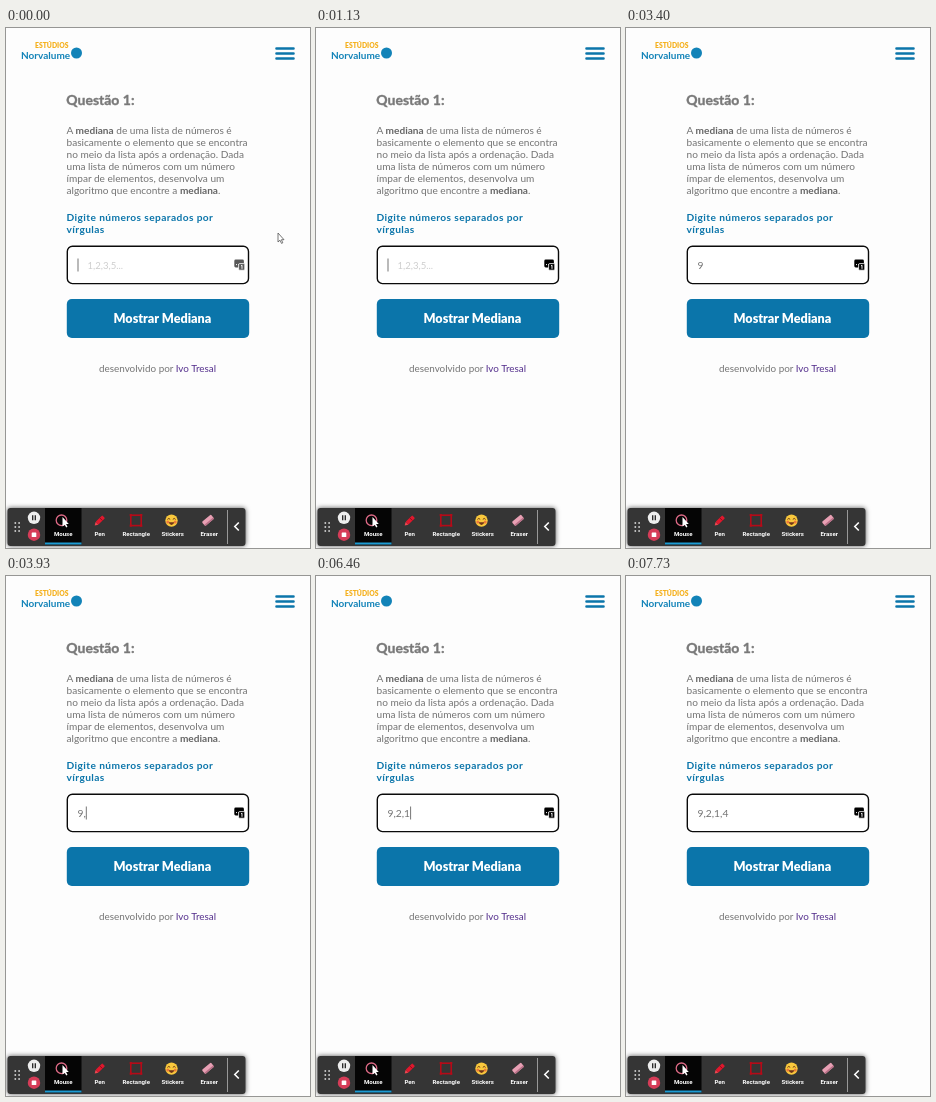
An HTML page that plays this animation: 304 px wide and 520 px high, repeating every 8 s.

```html
<!DOCTYPE html>
<html lang="pt-BR">
<head>
<meta charset="utf-8">
<title>Mediana</title>
<style>
  html, body { margin: 0; width: 100%; height: 100%; overflow: hidden; background: #fdfdfd; }
  svg { display: block; width: 304px; height: 520px; }
  text { font-family: Lato, sans-serif; white-space: pre; }
  .body { font-size: 10.1px; fill: #727272; }
  .body tspan { font-weight: 700; fill: #666; }
  .title { font-size: 14px; font-weight: 700; fill: #797979; stroke: #797979; stroke-width: .4px; }
  .label { font-size: 10.2px; font-weight: 700; letter-spacing: .4px; fill: #0b75aa; }
  .button { font-size: 12.6px; font-weight: 900; fill: #fff; text-anchor: middle; }
  .tool { font: 700 6.1px Roboto, sans-serif; fill: #fff; text-anchor: middle; }
  .bar { filter: drop-shadow(0 0 2.5px #000a); }
</style>
</head>
<body>
<svg viewBox="0 0 304 520">
  <rect width="304" height="520" fill="#fdfdfd"/>

  <g id="header">
    <text x="29" y="20" font-size="6.8" font-weight="900" fill="#f5b01c">ESTÚDIOS</text>
    <text x="15" y="31" font-size="10" font-weight="700" fill="#1283b8">Norvalume</text>
    <circle cx="70.5" cy="25" r="5.5" fill="#1283b8"/>
    <path d="M270.5 20.5h17M270.5 25.5h17M270.5 30.5h17" stroke="#0b75aa" stroke-width="2.6" stroke-linecap="round"/>
  </g>

  <text class="title" x="60.3" y="77">Questão 1:</text>
  <g id="paragraph"></g>
  <text class="label" x="60.5" y="193.2">Digite números separados por</text>
  <text class="label" x="60.5" y="205.4">vírgulas</text>

  <rect x="61.3" y="218.2" width="181.2" height="37.4" rx="5.2" fill="#fff" stroke="#0a0a0a" stroke-width="1.4"/>
  <text id="placeholder" x="81.5" y="241.4" font-size="9.6" fill="#cecece">1,2,3,5...</text>
  <text id="value" x="71.5" y="241.2" font-size="10.3" fill="#747474"></text>
  <rect id="caret" y="230.5" width="1" height="13" fill="#777"/>
  <g id="keypad">
    <rect x="228.3" y="231.5" width="9.6" height="8" rx="1.4"/>
    <path d="M230 236.6h1m1 0h1" stroke="#fff" stroke-width="1"/>
    <rect x="232.6" y="235.6" width="6.2" height="6.6" rx="1" stroke="#fff" stroke-width=".8"/>
    <path d="M235 238l1-.8v3.6" fill="none" stroke="#fff" stroke-width=".9"/>
  </g>

  <rect x="60.8" y="271" width="182.4" height="39" rx="5" fill="#0b75aa"/>
  <text class="button" x="156.4" y="295.2">Mostrar Mediana</text>
  <text x="93" y="344.3" font-size="9.9" fill="#747474">desenvolvido por <tspan fill="#55308d">Ivo Tresal</tspan></text>

  <path id="pointer" d="M272 205v9l2-1.8 1.5 3.2 1.3-.6-1.4-3.1h2.6z" fill="#fff" stroke="#555" stroke-width=".8"/>

  <g class="bar">
    <rect x="1.5" y="480" width="238" height="38" rx="3" fill="#353535"/>
    <rect x="39" y="480" width="36.5" height="36.5" fill="#050505"/>
    <rect x="39" y="514.5" width="36.5" height="2" fill="#1c9bd3"/>
  </g>
  <path d="M9.3 495v9M13.1 495v9" stroke="#ccc" stroke-width="1.9" stroke-linecap="round" stroke-dasharray="0 4"/>
  <circle cx="28" cy="489.8" r="6.2" fill="#eee"/>
  <path d="M26.7 487.3v5M29.3 487.3v5" stroke="#222" stroke-width="1.3"/>
  <circle cx="28" cy="506.7" r="6.2" fill="#d63c58"/>
  <rect x="25.7" y="504.4" width="4.6" height="4.6" rx=".6" fill="#fff"/>
  <path d="M221.5 482v34" stroke="#999"/>
  <path d="M232.8 494.5l-4 4 4 4" fill="none" stroke="#fff" stroke-width="1.6"/>

  <circle cx="55.5" cy="492.3" r="5.3" fill="none" stroke="#dd6a86" stroke-width="1.3"/>
  <path d="M56.5 489v9.5l2.2-1.8 1.5 2.8 1.3-.7-1.4-2.7h2.7z" fill="#fff"/>
  <g transform="translate(93.5 492.8) rotate(-45) scale(.9)">
    <rect x="-4" y="-2.2" width="10.5" height="4.4" rx="1" fill="#e0182d"/>
    <path d="M-4-2.2L-7.5 0-4 2.2z" fill="#f0454f"/>
    <path d="M2.5-2.2v4.4" stroke="#8d0c1b"/>
  </g>
  <rect x="124.8" y="487.2" width="10.4" height="10.4" fill="none" stroke="#b50a18" stroke-width="1.6"/>
  <path d="M123.7 487.2h2.2m8.2 0h2.2m-12.6 10.4h2.2m8.2 0h2.2" stroke="#b50a18" stroke-width="2.2"/>
  <circle cx="165.5" cy="492.6" r="6.2" fill="#f9c83c"/>
  <path d="M161.4 491.4q1.4-2 2.8 0M166.8 491.4q1.4-2 2.8 0" fill="none" stroke="#6b3a17"/>
  <circle cx="161.8" cy="494" r="1.5" fill="#ee7a3c"/>
  <circle cx="169.2" cy="494" r="1.5" fill="#ee7a3c"/>
  <path d="M162.8 494.3h5.4q-.6 2.8-2.7 2.8t-2.7-2.8z" fill="#713217"/>
  <g transform="translate(202 492.3) rotate(-40) scale(.95)">
    <rect x="-6.2" y="-2.8" width="12.4" height="5.6" rx="1.2" fill="#e8a0b4"/>
    <path d="M-6 2h12" stroke="#b86f86" stroke-width="1.5"/>
  </g>
  <g id="tools"></g>
</svg>
<script>
const LOOP = 8000;
const $ = id => document.getElementById(id);

const paragraph = [
  'A *mediana* de uma lista de números é',
  'basicamente o elemento que se encontra',
  'no meio da lista após a ordenação. Dada',
  'uma lista de números com um número',
  'ímpar de elementos, desenvolva um',
  'algoritmo que encontre a *mediana*.'
];
$('paragraph').innerHTML = paragraph.map((line, i) =>
  `<text class="body" x="60.5" y="${105.5 + 12.17 * i}">${line.replace(/\*(.+?)\*/g, '<tspan>$1</tspan>')}</text>`
).join('');

$('tools').innerHTML = ['Mouse', 'Pen', 'Rectangle', 'Stickers', 'Eraser'].map((name, i) =>
  `<text class="tool" x="${57.2 + 36.5 * i}" y="508.3">${name}</text>`
).join('');

// Each entry: start time, field value, caret shown
const states = [
  [0, '', true], [600, '', false], [1130, '', true], [1730, '', false], [2200, '', true],
  [2730, '9', true], [3400, '9', false], [3660, '9,', true], [4200, '9,', false],
  [4460, '9,2', true], [4730, '9,2,', true], [5260, '9,2,', false],
  [5330, '9,2,1', true], [5930, '9,2,1', false], [6460, '9,2,1', true],
  [6860, '9,2,1,', true], [7130, '9,2,1,4', true], [7730, '9,2,1,4', false]
];

const show = (id, on) => $(id).setAttribute('visibility', on ? 'visible' : 'hidden');

function draw(now) {
  const t = now % LOOP;
  const [, value, caretOn] = states.findLast(([start]) => start <= t);
  $('value').textContent = value;
  show('placeholder', !value);
  show('caret', caretOn);
  $('caret').setAttribute('x', 71.5 + (value ? $('value').getComputedTextLength() : 0));
  show('pointer', t < 100);
  const fade = Math.min(1, Math.max(0, (t - 60) / 270));
  $('keypad').setAttribute('opacity', 0.65 + 0.35 * fade);
}

const startTime = performance.now();
function tick() {
  draw(performance.now() - startTime);
  requestAnimationFrame(tick);
}
tick();
</script>
</body>
</html>
```
